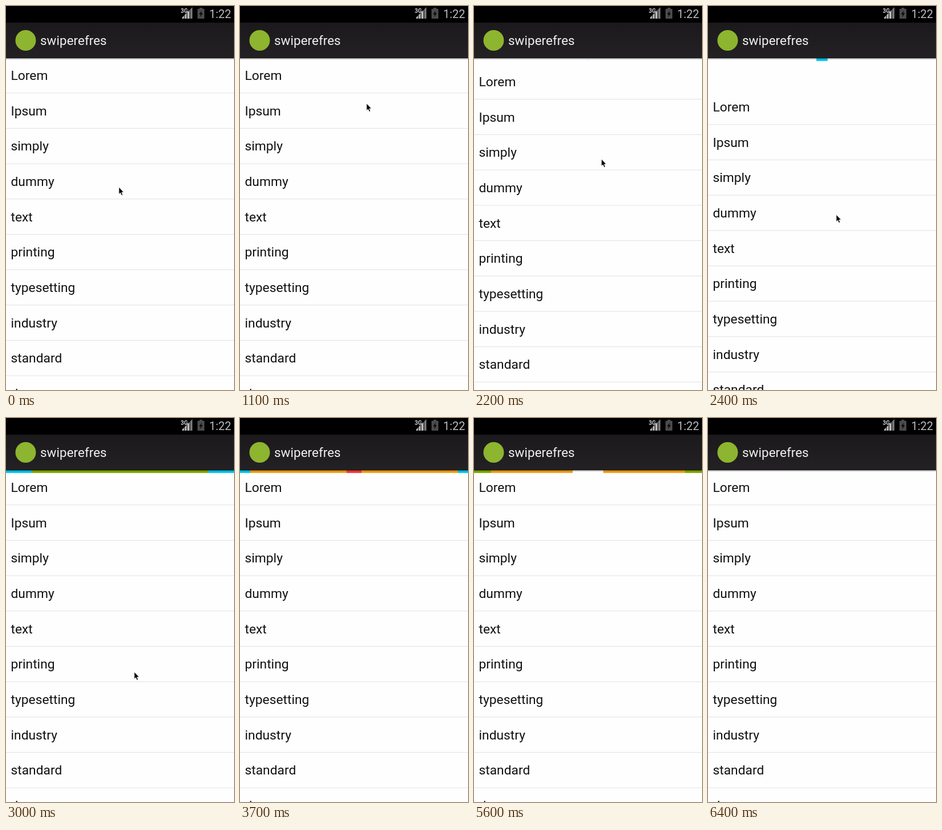
Animation of 400x670 px, one loop 7.3 s. Source, as an HTML page:

```html
<!DOCTYPE html>
<html lang="en">
<head>
<meta charset="utf-8">
<title>Swipe to refresh</title>
<style>
  html, body { margin: 0; width: 100%; height: 100%; overflow: hidden; background: #fefefe; }
  svg { display: block; width: 100vw; height: 100vh; }
  text { font-family: Roboto, sans-serif; font-size: 22.5px; }
  #list text { font-size: 22.8px; }
</style>
</head>
<body>
<svg viewBox="0 0 400 670">
  <defs>
    <linearGradient id="header" x2="0" y2="1">
      <stop offset="0" stop-color="#1b191b"/>
      <stop offset="1" stop-color="#242124"/>
    </linearGradient>
    <linearGradient id="shade" x2="0" y2="1">
      <stop offset="0" stop-opacity=".4"/>
      <stop offset="1" stop-opacity="0"/>
    </linearGradient>
  </defs>
  <rect width="400" height="670" fill="#fefefe"/>
  <rect id="pressed" y="91" width="400" height="61" fill="#ede8ec"/>
  <g id="list" fill="#111"></g>
  <g id="bar"></g>

  <rect width="400" height="29"/>
  <rect y="29" width="400" height="62" fill="url(#header)"/>
  <rect y="90" width="400" height="1" fill="#111"/>
  <rect y="91" width="400" height="3" fill="url(#shade)"/>
  <circle cx="34.5" cy="60" r="18" fill="#8db52f"/>
  <text x="60" y="68" fill="#f1f1f1">swiperefres</text>

  <text x="306.5" y="11.5" fill="#ccc" style="font-size:10px;font-weight:700">3G</text>
  <path fill="#b5b5b5" d="M309 22v-2l3.500-3.500v5.500zM313.500 22v-6.500l3.500-3.500v10zM318 22v-11l4-4v15z"/>
  <path fill="#777" d="M323 22v-16l4-4v20z"/>
  <path fill="#4b4b4b" d="M336 5h3.500v-2h5v2h3.500v17h-12z"/>
  <path fill="#0a0a0a" d="M343.500 8l-5 6.500h3l-1 5 5-7h-3z"/>
  <text x="395" y="21" text-anchor="end" fill="#bdbdbd" style="font-size:20px">1:22</text>

  <path id="cursor" d="M0 0v12.500l2.700-2.600 2 4.600 2.200-1-2-4.400h3.700z" stroke="#fff" stroke-width=".8"/>
</svg>
<script>
const $ = id => document.getElementById(id);
const LOOP = 7300, STEP = 100, CYCLE = 2000;
const FINISH_AT = 5400, FINISH_TIME = 1000;
const START_AT = 2500, TRIGGER = 150;
const LIST_TOP = 91.25, ROW = 61.67;
const COLORS = ['#08cbf6', '#86ae05', '#f7a41e', '#f9403f'];
const WORDS = ['Lorem', 'Ipsum', 'simply', 'dummy', 'text', 'printing',
  'typesetting', 'industry', 'standard', 'dummy'];

// Each key is [time, value, ...].
const CURSOR = [[0, 198, 316], [600, 198, 316], [1100, 222, 170], [2000, 222, 170],
  [2400, 225, 364], [2600, 225, 443], [3300, 225, 443]];
const PULL = [[2100, 0], [2300, 22], [2400, 55], [2500, 120], [2600, 40],
  [2700, 40], [2800, 8], [2900, 0]];
const SPIN = [[2500, 0], [2600, 100], [2700, 100], [3000, 500], [3700, 1150],
  [4800, 2270], [6400, 3870]];

function add(parent, tag, attrs, text = '') {
  const node = document.createElementNS('http://www.w3.org/2000/svg', tag);
  for (const key in attrs) node.setAttribute(key, attrs[key]);
  node.textContent = text;
  return parent.appendChild(node);
}

function track(keys, time, index = 1) {
  const next = keys.findIndex(key => key[0] > time);
  if (next === 0) return keys[0][index];
  if (next < 0) return keys[keys.length - 1][index];
  const a = keys[next - 1], b = keys[next];
  return a[index] + (b[index] - a[index]) * (time - a[0]) / (b[0] - a[0]);
}

// cubic-bezier(.4, 0, .2, 1), solved by bisection
function ease(x) {
  if (x <= 0 || x >= 1) return Math.min(1, Math.max(0, x));
  let low = 0, high = 1, s;
  for (let i = 0; i < 24; i++) {
    s = (low + high) / 2;
    if (1.2 * (1 - s) ** 2 * s + .6 * (1 - s) * s * s + s ** 3 < x) low = s;
    else high = s;
  }
  return 3 * s * s - 2 * s ** 3;
}

WORDS.forEach((word, i) => {
  const top = LIST_TOP + i * ROW;
  add($('list'), 'text', { x: 8.5, y: top + 37.75 }, word);
  add($('list'), 'rect', { y: top + 60, width: 400, height: 1, fill: '#e2e2e2' });
});

const strips = Array.from({ length: 7 }, () => add($('bar'), 'rect', { y: 91, height: 5 }));

function setStrip(index, scale, color) {
  const strip = strips[index];
  strip.setAttribute('x', 200 - 200 * scale);
  strip.setAttribute('width', 400 * scale);
  strip.setAttribute('fill', color);
}

function drawBar(time, pull) {
  strips.forEach((_, i) => setStrip(i, 0, 'none'));
  if (time < START_AT) {
    setStrip(0, (pull / TRIGGER) ** 3, COLORS[0]);
    return;
  }
  if (time >= FINISH_AT + FINISH_TIME) return;

  const elapsed = track(SPIN, time);
  const phase = elapsed % CYCLE / CYCLE;
  const base = elapsed < CYCLE ? 0 : (Math.floor(phase * 4) + 3) % 4;
  setStrip(0, 1, COLORS[base]);
  for (let i = 0; i < 5; i++) {
    const progress = (phase - (i - 1) / 4) * 2;
    if (progress > 0 && progress <= 1) setStrip(i + 1, ease(progress), COLORS[i % 4]);
  }
  setStrip(6, ease((time - FINISH_AT) / FINISH_TIME), '#fefefe');
}

function render(now) {
  const time = Math.floor(now % LOOP / STEP) * STEP;
  const pull = track(PULL, time);
  $('list').setAttribute('transform', `translate(0 ${pull})`);
  $('pressed').style.display = time >= 1900 && time < 2200 ? '' : 'none';
  $('cursor').style.display = time < 3300 ? '' : 'none';
  $('cursor').setAttribute('transform',
    `translate(${track(CURSOR, time)} ${track(CURSOR, time, 2)})`);
  drawBar(time, pull);
}

const start = performance.now();
function frame() {
  render(performance.now() - start);
  requestAnimationFrame(frame);
}
frame();
</script>
</body>
</html>
```
